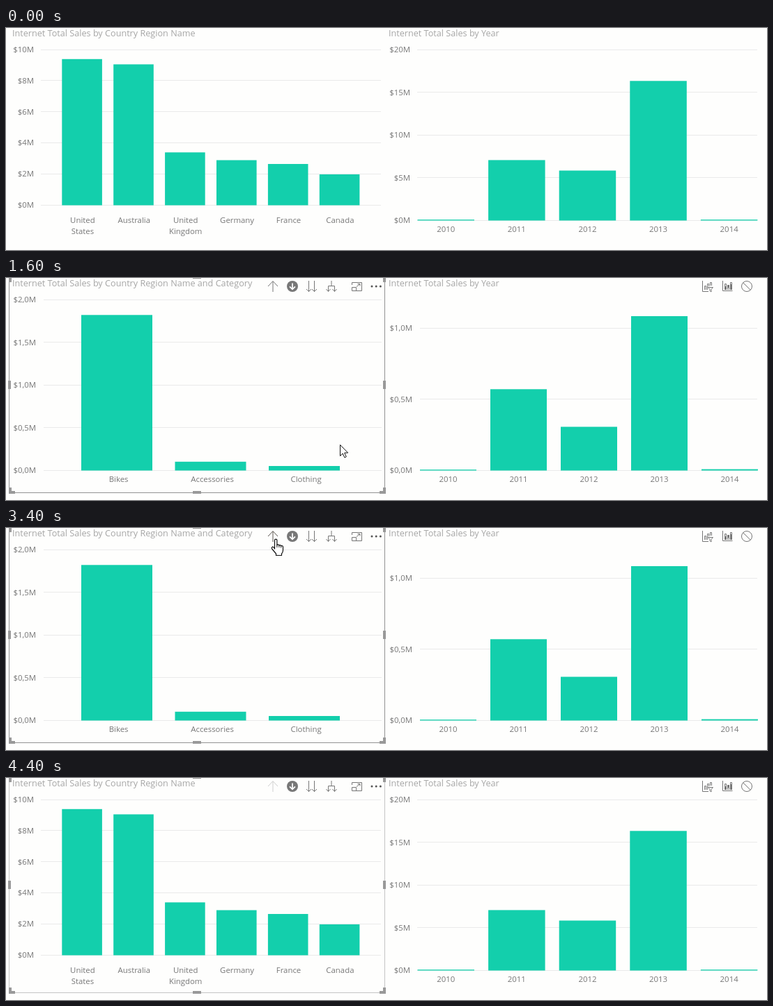
An HTML page for the animation above (4.8 s loop, 1092x320 px).

```html
<!DOCTYPE html>
<html lang="en">
<head>
<meta charset="utf-8">
<title>Sales drill down</title>
<style>
html, body { margin: 0; width: 100%; height: 100%; overflow: hidden; background: #fefefd; }
svg { display: block; width: 1092px; height: 320px; }
text { font: 11.4px "Open Sans", "Noto Sans", sans-serif; fill: #777; }
.title { font-size: 12.65px; fill: #a6a6a6; }
.grid { stroke: #eaeaea; }
.bar { fill: #13cfac; }
.line { fill: none; stroke: #777; }
.solid { fill: #777; }
.mid { text-anchor: middle; }
.end { text-anchor: end; }
.handles { fill: #999; }

.base, .drill, .hover, .selected, .focus, .border, .up, .arrow, .hand {
  animation: 4800ms step-end infinite;
}
.base { animation-name: base; }
.drill { animation-name: drill; }
.long { animation-name: long; }
.short { animation-name: short; }
.hover { animation-name: hover; }
.selected { animation-name: selected; }
.focus { animation-name: focus; }
.border { animation-name: border; }
.up { animation-name: up; }
.arrow { animation-name: arrow, path; }
.hand { animation-name: hand; }

@keyframes base { 0%, 75% { visibility: visible } 33.33% { visibility: hidden } }
@keyframes drill { 0%, 75% { visibility: hidden } 33.33% { visibility: visible } }
@keyframes short { 0%, 75% { visibility: visible } 29.16% { visibility: hidden } }
@keyframes long { 0%, 75% { visibility: hidden } 29.16% { visibility: visible } }
@keyframes hover { 0% { visibility: hidden } 12.5%, 100% { visibility: visible } }
@keyframes selected { 0% { visibility: hidden } 29.16%, 100% { visibility: visible } }
@keyframes focus { 0%, 33.33% { visibility: hidden } 29.16% { visibility: visible } }
@keyframes border { 0%, 87.5%, 100% { stroke: #c4c4c4 } 29.16% { stroke: #929292 } }
@keyframes up { 0%, 75%, 100% { stroke: #cfcfcf } 29.16% { stroke: #777 } 62.5% { stroke: #5c5650 } }
@keyframes arrow { 0%, 62.5%, 87.5%, 100% { visibility: hidden } 12.5%, 75% { visibility: visible } }
@keyframes hand { 0%, 75%, 100% { visibility: hidden } 62.5% { visibility: visible } }
@keyframes path {
  0%, 12.5% { transform: translate(436px, 266px) }
  16.66% { transform: translate(462px, 250px) }
  20.83% { transform: translate(479px, 240px) }
  41.66% { transform: translate(472px, 232px) }
  45.83% { transform: translate(446px, 212px) }
  50% { transform: translate(398px, 181px) }
  54.16% { transform: translate(328px, 40px) }
  58.33% { transform: translate(366px, 26px) }
  75% { transform: translate(360.5px, 75px) }
  79.16% { transform: translate(346px, 120px) }
  83.33%, 100% { transform: translate(322px, 214px) }
}
</style>
</head>
<body>
<svg viewBox="0 0 1092 320">
  <g id="charts"></g>

  <text class="title base short" x="9" y="12">Internet Total Sales by Country Region Name</text>
  <text class="title drill long" x="9" y="12">Internet Total Sales by Country Region Name and Category</text>
  <text class="title" x="549" y="12">Internet Total Sales by Year</text>

  <g class="hover">
    <path class="line border" d="M4.5 0V309.5H543.5V0"/>
    <path class="line up" d="M383 20V5M376 12l7-7.5 7 7.5"/>
    <circle class="solid" cx="411" cy="12" r="8"/>
    <path d="M411 7.5V16M407 12.3l4 4 4-4" fill="none" stroke="#fff" stroke-width="1.7"/>
    <path class="line" d="M434.5 4V19.5M431 16l3.5 3.5 3.5-3.5M442.5 4V19.5M439 16l3.5 3.5 3.5-3.5"/>
    <path class="line" d="M467 4V11M462.5 19V11.5H471.5V19M459.500 16l3 3.500 3-3.500M468.500 16l3 3.500 3-3.500"/>
    <path class="line" d="M496.500 10V6.500H510.500V18.500H496.500V13.500H502.500V18M503 12.500l5-4M504.500 8.500H508V11.500"/>
    <g fill="#555">
      <circle cx="525" cy="12" r="1.5"/><circle cx="531.2" cy="12" r="1.5"/><circle cx="537.4" cy="12" r="1.5"/>
    </g>
  </g>

  <g class="selected">
    <path class="handles" d="M4 0h4v6h-4zM541 0h4v6h-4zM268 0h12v1h-12zM3 148h4v12h-4zM541 148h4v12h-4zM268 307h12v4h-12zM4 302h4v5h5v4h-9zM545 302h-4v5h-5v4h9z"/>
    <path class="line" d="M999.500 4V19.500H1008M1002.500 17V11.500H1004.500V17M1006.500 17V8.500H1008.500V12M1010.500 11V6.500H1012.500V11M1007.500 13.500H1014.500L1012 16.500V20L1010 18.500V16.500Z"/>
    <path class="line" d="M1028.500 4V18.500H1042.500M1031.500 17V8.500H1033.500V17M1035.500 17V10.500H1037.500V17M1039.500 17V6.500H1041.500V17"/>
    <path class="solid" d="M1031 12h3v5h-3zM1035 10h3v4h-3zM1039 9h3v8h-3z"/>
    <circle class="line" cx="1063" cy="12" r="7.5"/>
    <path class="line" d="M1057.700 6.700l10.600 10.600"/>
  </g>
  <path class="focus" fill="#444" d="M9 2h1.500v1.500h-1.500zM9 10.500h1.500v1.500h-1.500zM549.500 2h1.500v1.500h-1.500zM549.500 10.500h1.500v1.500h-1.500z"/>

  <path class="arrow" fill="#fff" stroke="#111" d="M.5.5V16.500L4.200 13 6.900 18.800 9.300 17.700 6.700 12H11.700Z"/>
  <g class="hand">
    <g transform="translate(380 15)" stroke="#111" stroke-linejoin="round">
      <path fill="#fff" stroke-width="1.200" d="M5.500 15V2.800a1.700 1.700 0 0 1 3.400 0V9.500q1.600-1.200 3 .4 1.700-.9 2.800.7 2.600-.6 2.800 1.800V17q0 3-2 5v2.500H7.500V22Q5 19 2 15.500 .5 13 2.400 12.200 4 12 5.500 15Z"/>
      <path fill="none" d="M8.900 9V13M11.900 10V13M14.700 10.800V13.500"/>
    </g>
  </g>
</svg>
<script>
const NS = "http://www.w3.org/2000/svg";

function add(parent, tag, attrs, text = "") {
  const el = parent.appendChild(document.createElementNS(NS, tag));
  for (const key in attrs) el.setAttribute(key, attrs[key]);
  el.textContent = text;
  return el;
}

function chart(c) {
  const g = add(document.getElementById("charts"), "g", { class: c.state });
  const [top, bottom] = c.rows;
  c.ticks.forEach((tick, i) => {
    const y = top + (bottom - top) * i / (c.ticks.length - 1);
    const lineY = Math.floor(y) + 0.5;
    add(g, "line", { class: "grid", x1: c.from, x2: c.to, y1: lineY, y2: lineY });
    add(g, "text", { class: "end", x: c.labelX, y: y + 4 }, "$" + tick + "M");
  });
  c.names.forEach((name, i) => {
    const x = c.first + c.pitch * i;
    add(g, "rect", { class: "bar", x, y: c.tops[i], width: c.width, height: bottom + 0.5 - c.tops[i] });
    name.split(" ").forEach((word, row) =>
      add(g, "text", { class: "mid", x: x + c.width / 2 + c.shift, y: c.nameY + 16 * row }, word));
  });
}

const years = ["2010", "2011", "2012", "2013", "2014"];

chart({
  state: "base", from: 50, to: 538, rows: [31, 255], labelX: 40,
  ticks: [10, 8, 6, 4, 2, 0],
  names: ["United States", "Australia", "United Kingdom", "Germany", "France", "Canada"],
  first: 80.3, pitch: 73.9, width: 57.6, shift: 0.8, nameY: 281,
  tops: [44.8, 52.4, 179.3, 190.5, 196, 211]
});
chart({
  state: "base", from: 590, to: 1078, rows: [31, 277], labelX: 580,
  ticks: [20, 15, 10, 5, 0], names: years,
  first: 590.5, pitch: 101.6, width: 81.5, shift: 0, nameY: 294,
  tops: [276.2, 190.4, 205.5, 76.3, 276.2]
});
chart({
  state: "drill", from: 54, to: 539, rows: [31, 277], labelX: 43,
  ticks: ["2,0", "1,5", "1,0", "0,5", "0,0"],
  names: ["Bikes", "Accessories", "Clothing"],
  first: 108, pitch: 134.5, width: 102, shift: 2.6, nameY: 294,
  tops: [53.3, 264.8, 271]
});
chart({
  state: "drill", from: 594, to: 1078, rows: [72, 277], labelX: 583,
  ticks: ["1,0", "0,5", "0,0"], names: years,
  first: 594, pitch: 101, width: 81, shift: 0, nameY: 294,
  tops: [276.2, 160.3, 214.5, 55, 275.6]
});
</script>
</body>
</html>
```
